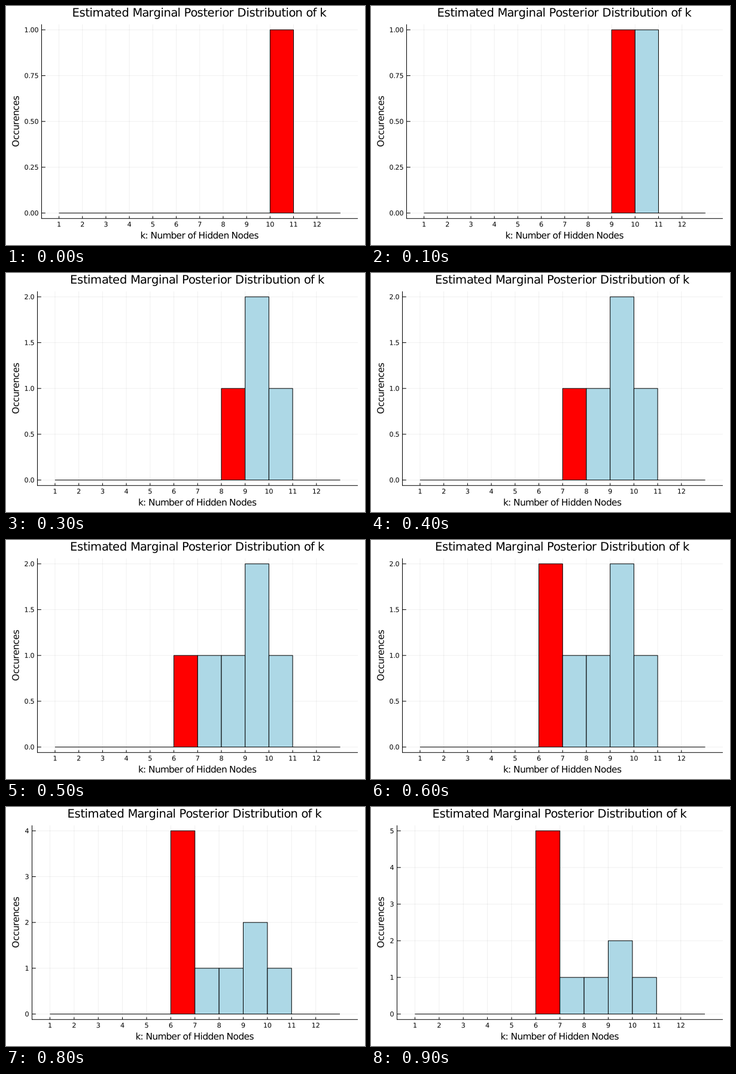
Animation of 600x400 px, one loop 1000 ms. Source, as a matplotlib script:

```python
import math
from functools import lru_cache

import matplotlib.pyplot as plt
from matplotlib.animation import FuncAnimation
from matplotlib.patches import PathPatch, Rectangle
from matplotlib.path import Path
from matplotlib.textpath import TextPath
from matplotlib.transforms import Affine2D

W, H, DPI = 600, 400, 100
PX = 72 / DPI  # points per pixel
TEXT_SCALE = 1.395  # pixels per point of text
SAMPLES = [10, 9, 9, 8, 7, 6, 6, 6, 6, 6]
RIGHT, TOP, BOTTOM = 588, 30.7, 355.7
Y_ZERO, Y_PEAK = 346.5, 39.9
FIRST, LAST = 1, 13

plt.rcParams.update({"font.family": "DejaVu Sans", "path.snap": False})
fig = plt.figure(figsize=(W / DPI, H / DPI), dpi=DPI, facecolor="white")
ax = fig.add_axes([0, 0, 1, 1])


def line(x0, y0, x1, y1, z=4, **style):
    ax.plot([x0, x1], [y0, y1], color="black", lw=PX, zorder=z,
            solid_capstyle="butt", **style)


@lru_cache(maxsize=None)
def glyph(char, size):
    """Outline of a character and its advance in whole pixels."""
    def reach(s):
        return TextPath((0, 0), s, size=size).vertices[:, 0].max()

    advance = math.floor(reach(char + "|") - reach("|") + 1e-6)
    return TextPath((0, 0), char, size=size), advance


def label(x, y, text, points, align=0.5, angle=0):
    """Text on baseline y; align 0.5 centres it on x, 1 ends it there."""
    outlines, pen = [], 0
    for char in text:
        outline, advance = glyph(char, points * TEXT_SCALE)
        if char != " ":
            outlines.append(outline.transformed(Affine2D().translate(pen, 0)))
        pen += advance
    place = Affine2D().translate(-align * pen, 0).scale(1, -1)
    place.rotate_deg(-angle).translate(x, y)
    path = Path.make_compound_path(*outlines).transformed(place)
    ax.add_patch(PathPatch(path, fc="black", lw=0, zorder=5))


def y_axis(peak):
    """Left edge of the plot, tick step and label format for a peak count."""
    if peak == 1:
        return 59.5, 0.25, "{:.2f}"
    if peak == 2:
        return 52.5, 0.5, "{:.1f}"
    return 43.5, 1, "{:.0f}"


def draw(frame):
    ax.clear()
    ax.set(xlim=(0, W), ylim=(H, 0))
    ax.axis("off")

    seen = SAMPLES[:frame + 1]
    peak = max(seen.count(k) for k in seen)
    left, step, fmt = y_axis(peak)
    # the data range is widened by 6 % twice
    unit = (RIGHT - left) / ((LAST - FIRST) * 1.06 ** 2)
    middle = (left + RIGHT) / 2

    def px(k):
        return middle + (k - (FIRST + LAST) / 2) * unit

    def py(n):
        return Y_ZERO + (Y_PEAK - Y_ZERO) * n / peak

    for k in range(FIRST, LAST):
        x = px(k)
        line(x, TOP, x, BOTTOM, z=1, alpha=0.06)
        line(x, BOTTOM, x, BOTTOM - 4)
        label(x, 369.3, str(k), 8)
    for i in range(round(peak / step) + 1):
        y = py(i * step)
        line(left, y, RIGHT, y, z=1, alpha=0.06)
        line(left, y, left + 6.3, y)
        label(left - 5, y + 4, fmt.format(i * step), 8, align=1)

    for k in sorted(set(seen)):
        color = "red" if k == seen[-1] else "lightblue"
        ax.add_patch(Rectangle((px(k), Y_ZERO), unit, py(seen.count(k)) - Y_ZERO,
                               fc=color, ec="black", lw=PX, zorder=3))
    line(px(FIRST), Y_ZERO, px(LAST), Y_ZERO)
    line(left, TOP, left, BOTTOM + 0.5)
    line(left, BOTTOM, RIGHT, BOTTOM)

    label(middle - 0.75, 17.7, "Estimated Marginal Posterior Distribution of k", 14)
    label(middle - 0.75, 389.2, "k: Number of Hidden Nodes", 11)
    label(21.5, 193.5, "Occurences", 11, angle=90)
    return []


anim = FuncAnimation(fig, draw, frames=len(SAMPLES), init_func=lambda: [],
                     interval=100, repeat=True, repeat_delay=0)
plt.show()
```
